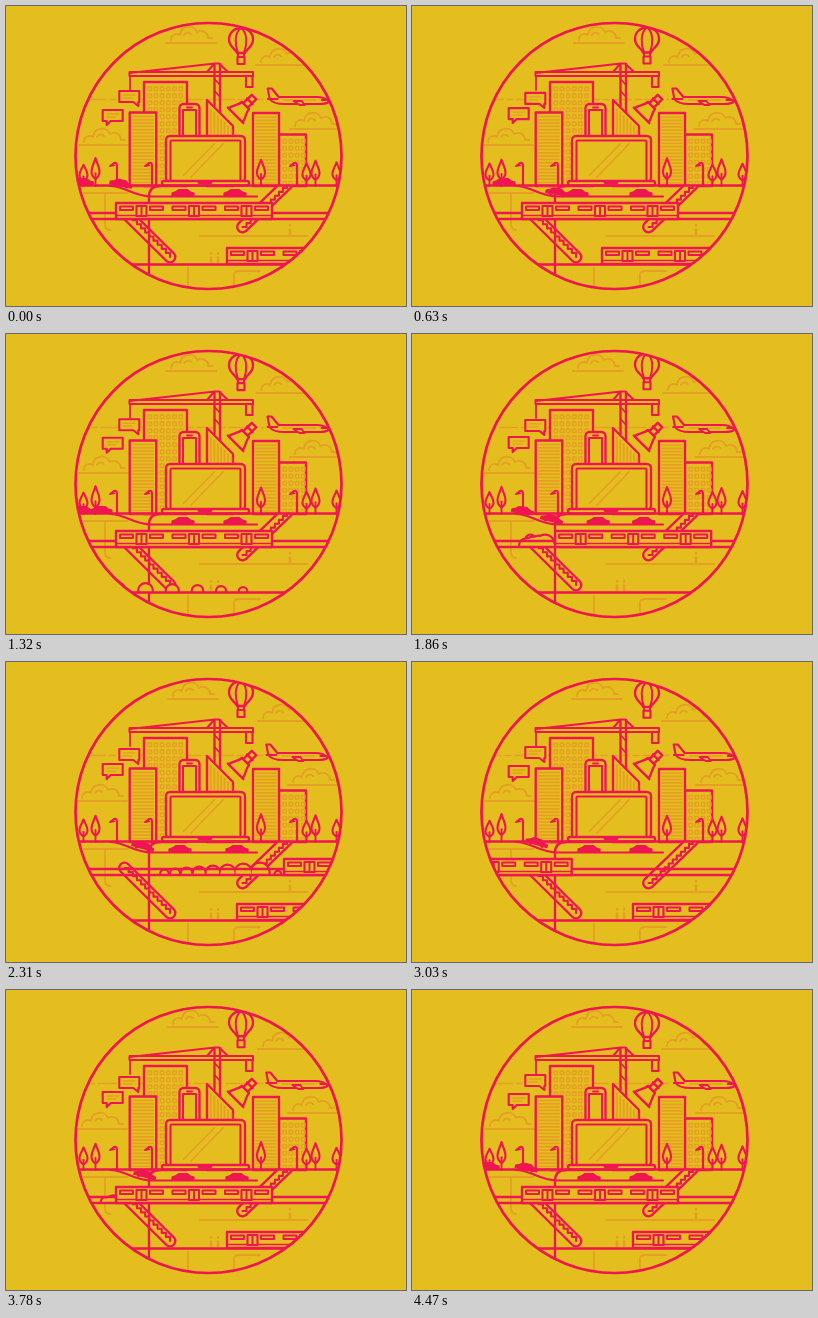
An HTML page with a canvas for the animation above (4.5 s loop, 400 by 300 pixels).

```html
<!DOCTYPE html>
<html lang="en">
<head>
<meta charset="utf-8">
<title>City in a circle</title>
<style>
html, body { margin: 0; width: 100%; height: 100%; overflow: hidden; background: #e3be1e; }
canvas { display: block; width: 400px; height: 300px; }
</style>
</head>
<body>
<canvas id="stage"></canvas>
<script>
const PINK = '#ee1550', GOLD = '#e3be1e', FAINT = '#e69f24';
const LOOP = 4500, STEP = 30, WEIGHT = 1.18;
const canvas = document.getElementById('stage');
const ctx = canvas.getContext('2d');
const ratio = window.devicePixelRatio || 1;
canvas.width = 400 * ratio;
canvas.height = 300 * ratio;

function at(x, y, draw) {
  ctx.save();
  ctx.translate(x, y);
  draw();
  ctx.restore();
}

function paint(path, { stroke = PINK, fill, width = 2 } = {}) {
  if (fill) { ctx.fillStyle = fill; ctx.fill(path); }
  ctx.strokeStyle = stroke;
  ctx.lineWidth = width * WEIGHT;
  ctx.stroke(path);
}

const shape = (d, style) => paint(new Path2D(d), style);
const faint = (d, width = 1.5) => shape(d, { stroke: FAINT, width });
const solid = (d, width = 2) => shape(d, { fill: GOLD, width });

function box(x, y, w, h, r = 0, width = 2) {
  const path = new Path2D();
  path.roundRect(x, y, w, h, r);
  paint(path, { fill: GOLD, width });
}

function clipBox(x, y, w, h, draw) {
  ctx.save();
  ctx.beginPath();
  ctx.rect(x, y, w, h);
  ctx.clip();
  draw();
  ctx.restore();
}

// Keyframes are [time, value, time, value, ...] with eased segments.
function track(keys, t) {
  if (t < keys[0] || t > keys[keys.length - 2]) return null;
  let i = 0;
  while (i < keys.length - 4 && t > keys[i + 2]) i += 2;
  const u = (t - keys[i]) / (keys[i + 2] - keys[i]);
  return keys[i + 1] + (keys[i + 3] - keys[i + 1]) * u * u * (3 - 2 * u);
}

function cloud(x, y) {
  at(x, y, () => faint('M0 0H50M5 -3C5 -9 11 -10 14 -8C15 -18 28 -19 31 -11C37 -14 42 -10 42 -5H46M18 -8C20 -11 23 -11 25 -9'));
}

function stripes(x, y, w, h) {
  for (let j = y + 4; j < y + h; j += 3.3) faint(`M${x + 3} ${j}h${w - 6}`, 1.4);
}

function windows(x, y, w, h) {
  for (let j = y + 5; j < y + h - 3; j += 7)
    for (let i = x + 4; i < x + w - 4; i += 6.2) faint(`M${i} ${j}h3.4v3.6h-3.4Z`, 1.2);
}

function tower(x, y, w, pattern) {
  box(x, y, w, 180 - y);
  pattern(x, y, w, 180 - y);
}

function tree(x, height, stretch) {
  ctx.save();
  ctx.translate(x, 180);
  ctx.scale(1, height * stretch / 26);
  solid('M0 -26C1.5 -21 4 -18 4 -13.5C4 -10 2.5 -8 0 -6.5C-2.5 -8 -4 -10 -4 -13.5C-4 -18 -1.5 -21 0 -26Z', 1.8);
  shape('M0 0V-12', { width: 1.6 });
  ctx.restore();
}

function lamp(x) {
  at(x, 180, () => {
    shape('M0 0V-20Q0 -24 -3 -23L-5 -21', { width: 1.8 });
    shape('M-7.5 -19.5Q-6 -23 -2.5 -20.5Z', { fill: PINK, width: 1 });
  });
}

function skyline() {
  tower(138, 76, 43, windows);
  tower(123.7, 106.5, 26.5, stripes);
  solid('M201 180V94L227 120V180Z');
  for (let x = 205; x < 227; x += 3.4) faint(`M${x} ${x - 102}V130`, 1.4);
  tower(273, 128.5, 27, windows);
  tower(247, 107, 26, stripes);
}

function crane() {
  shape('M208.5 58V100M214 58V106');
  shape('M208.5 73L214 79M208.5 85L214 91', { width: 1.4 });
  shape('M123.5 66H247V70H123.5ZM123.5 67L209 57.5H213L222 66M201 66L208 58', { width: 1.7 });
  shape('M124 70V84', { width: 1.5 });
  box(240, 70, 6.5, 11, 0, 1.8);
}

function spotlight() {
  at(236, 103, () => {
    ctx.rotate(Math.PI / 4);
    solid('M-11 9H11M-10 9C-9 3 -5 0 -5 -5H5C5 0 9 3 10 9Z');
    solid('M-3.2 -5V-17H3.2V-5Z');
    shape('M-4 -11H4');
  });
}

function devices() {
  box(173.5, 98, 20, 44, 4);
  box(177, 104, 13, 35, 0, 1.7);
  shape('M181 101.5H186', { width: 1.5 });
  box(160, 130, 79, 46, 4);
  box(164.5, 134.5, 70, 42, 1, 1.8);
  faint('M178 169L208 138M185 171L217 138');
  box(156, 175, 87, 4.5, 2);
  shape('M193 176.5H205', { width: 2.4 });
}

function balloon(y) {
  at(235, y, () => {
    solid('M-4 25C-5 21 -12 19 -12 11.5C-12 5 -7 0 0 0S12 5 12 11.5C12 19 5 21 4 25Z');
    shape('M0 0C-7 5 -6 17 -3 25M0 0C7 5 6 17 3 25', { width: 1.7 });
    solid('M-3.5 29H3.5V36H-3.5ZM-3 25V29M3 25V29', 1.8);
  });
}

function plane(x) {
  at(x, 82, () => {
    solid('M0 0.5H4L11 9H49C55 9 59 11 61.5 13.5C60 15.5 56 16 51 16H17C9 16 4 14 2 11Z', 1.8);
    shape('M0 11H10M54 12H59', { width: 1.5 });
    faint('M16 12H48', 1.2);
    solid('M26 13H34L37 17H32Z', 1.6);
  });
}

function bubbles(sway) {
  solid(`M113.3 ${86 - sway}h20v11h-1v4l-5 -4h-14Z`, 1.8);
  solid(`M96.7 ${103 + sway}h20v11h-12l-4 4v-4h-4Z`, 1.8);
  faint(`M117 ${90 - sway}h12m-12 3h9`, 1.1);
  faint(`M101 ${107 + sway}h12m-12 3h9`, 1.1);
}

function escalator(x1, y1, x2, y2) {
  for (const [stroke, width] of [[PINK, 11], [GOLD, 7]]) shape(`M${x1} ${y1}L${x2} ${y2}`, { stroke, width });
  const n = 11, dx = (x2 - x1) / n, dy = (y2 - y1) / n;
  shape(`M${x1} ${y1}` + `h${dx}v${dy}`.repeat(n), { width: 1.8 });
}

function underground() {
  faint('M75 187H122M99 188V218Q99 224 104 224M194 230H302M228 280V269Q228 265 233 265H254M182 262V280');
  for (const [x, y] of [[284, 219], [205, 247], [212, 247]]) faint(`M${x} ${y}v.5m0 4v6`, 2.2);
  clipBox(0, 180, 400, 78, () => {
    escalator(118.5, 206, 164, 251);
    escalator(236.5, 221, 281, 178);
  });
  shape('M143 270V191Q143 180 154 180');
}

function road() {
  shape('M68 179.5H338');
  shape('M104 180C120 180 126 190.5 146 190.5H251', { width: 1.8 });
}

const cars = [
  [-500, 55, 0, 115, 630, 165, 1320, 229, 1800, 229, 2200, 275],
  [-300, 55, -30, 76, 630, 145, 1320, 177, 1700, 177, 2310, 231, 2600, 231, 2950, 275],
  [300, 55, 630, 92, 1320, 95, 2310, 174, 3030, 229, 3300, 229, 3700, 275],
  [1000, 55, 1320, 76, 2310, 137, 3030, 177, 3780, 231, 4000, 231, 4400, 275],
  [2400, 55, 3030, 125, 3780, 177, 4470, 229, 4600, 229, 5000, 275],
  [3100, 55, 3780, 139, 4470, 177, 4530, 177, 5130, 229, 5300, 229, 5700, 275]
];

function car(x) {
  const slope = Math.min(1, Math.max(0, (x - 104) / 50));
  at(x, 176 + 11 * slope * slope * (3 - 2 * slope), () => {
    ctx.rotate(slope * (1 - slope) * 1.2);
    shape('M-11 2.5V0L-7 -1.5L-4 -3.5H4L7.5 -1L11 0V2.5Z', { fill: PINK, width: 1 });
    for (const wheel of [-6, 6]) {
      ctx.beginPath();
      ctx.arc(wheel, 2.4, 1.7, 0, 7);
      ctx.fill();
    }
  });
}

function traffic(t) {
  clipBox(0, 150, 251, 60, () => {
    for (const keys of cars)
      for (const shift of [-LOOP, 0, LOOP]) {
        const x = track(keys, t + shift);
        if (x !== null) car(x);
      }
  });
}

// Each train leaves with acceleration and comes back from the other side, braking.
function upperTrain(t) {
  if (t < 1500) return 110;
  if (t < 2700) return 110 + 168 * ((t - 1500) / 810) ** 2;
  return 110 - 265 * Math.max(0, (3600 - t) / 900) ** 2;
}

function lowerTrain(t) {
  if (t < 350) return 221;
  if (t < 1600) return 221 - 31 * ((t - 350) / 280) ** 2;
  return 221 + 157 * Math.max(0, (2550 - t) / 950) ** 2;
}

function train(x, y) {
  box(x, y, 156, 16);
  shape(`M${x} ${y + 12.5}h156`, { width: 1.4 });
  for (let i = 0; i < 3; i++) {
    const left = x + i * 52.5;
    for (const offset of [4, 34]) box(left + offset, y + 3.5, 13, 3.5, 0, 1.7);
    box(left + 20.5, y + 3, 10, 10, 0, 1.8);
    shape(`M${left + 25.5} ${y + 3}v10`, { width: 1.7 });
  }
}

// Puffs are born at the rear of a moving train, then shrink; they merge into one outline.
function smoke(position, t, floor) {
  const life = 400, outline = new Path2D();
  for (let born = Math.ceil((t - life) / 45) * 45; born < t; born += 45) {
    const speed = position(born) - position(born - 10);
    if (born < 10 || Math.abs(speed) < 0.4 || Math.abs(speed) > 50) continue;
    const age = t - born;
    const r = 9.5 * Math.min(1, age / 60) * (1 - 0.7 * age / life);
    const x = position(born) + (speed < 0 ? 156 : 0);
    outline.moveTo(x + r, floor - r / 3);
    outline.arc(x, floor - r / 3, r, 0, 7);
  }
  clipBox(0, floor - 20, 400, 20, () => {
    paint(outline, { width: 3.6 });
    ctx.fillStyle = GOLD;
    ctx.fill(outline);
  });
}

function render(t) {
  const sway = Math.cos(t / 1500 * 2 * Math.PI);
  const drift = Math.cos(t / LOOP * 2 * Math.PI);
  ctx.setTransform(ratio, 0, 0, ratio, 0, 0);
  ctx.fillStyle = GOLD;
  ctx.fillRect(0, 0, 400, 300);
  ctx.lineCap = ctx.lineJoin = 'round';

  const frame = new Path2D();
  frame.arc(202.5, 150, 133, 0, 7);
  ctx.save();
  ctx.clip(frame);
  cloud(161 - sway, 37);
  cloud(251 - sway, 59);
  cloud(283 + sway, 123);
  cloud(72 + sway, 139);
  ctx.setLineDash([18, 4, 6, 4]);
  ctx.lineDashOffset = t / LOOP * 64;
  faint('M82 93.5H257', 1.3);
  ctx.setLineDash([]);

  skyline();
  crane();
  spotlight();
  devices();
  balloon(20.5 + 1.5 * drift);
  plane(261 + 0.7 * sway);
  bubbles(sway);
  [[77.5, 22], [89.5, 27], [255, 27], [300.5, 22], [309.5, 26], [330.5, 23]].forEach(([x, height], i) =>
    tree(x, height, 1 + (i % 2 ? 0.03 : -0.03) * sway));
  [111, 146, 291].forEach(lamp);

  underground();
  road();
  traffic(t);
  smoke(upperTrain, t, 213);
  smoke(lowerTrain, t, 258.5);
  shape('M68 207H338M68 213H338M110 258.5H296');
  train(upperTrain(t), 197);
  clipBox(0, 230, 400, 30, () => train(lowerTrain(t), 242));
  ctx.restore();
  paint(frame, { width: 2.3 });
}

function tick() {
  render(Math.floor(performance.now() % LOOP / STEP) * STEP);
  requestAnimationFrame(tick);
}
tick();
</script>
</body>
</html>
```
